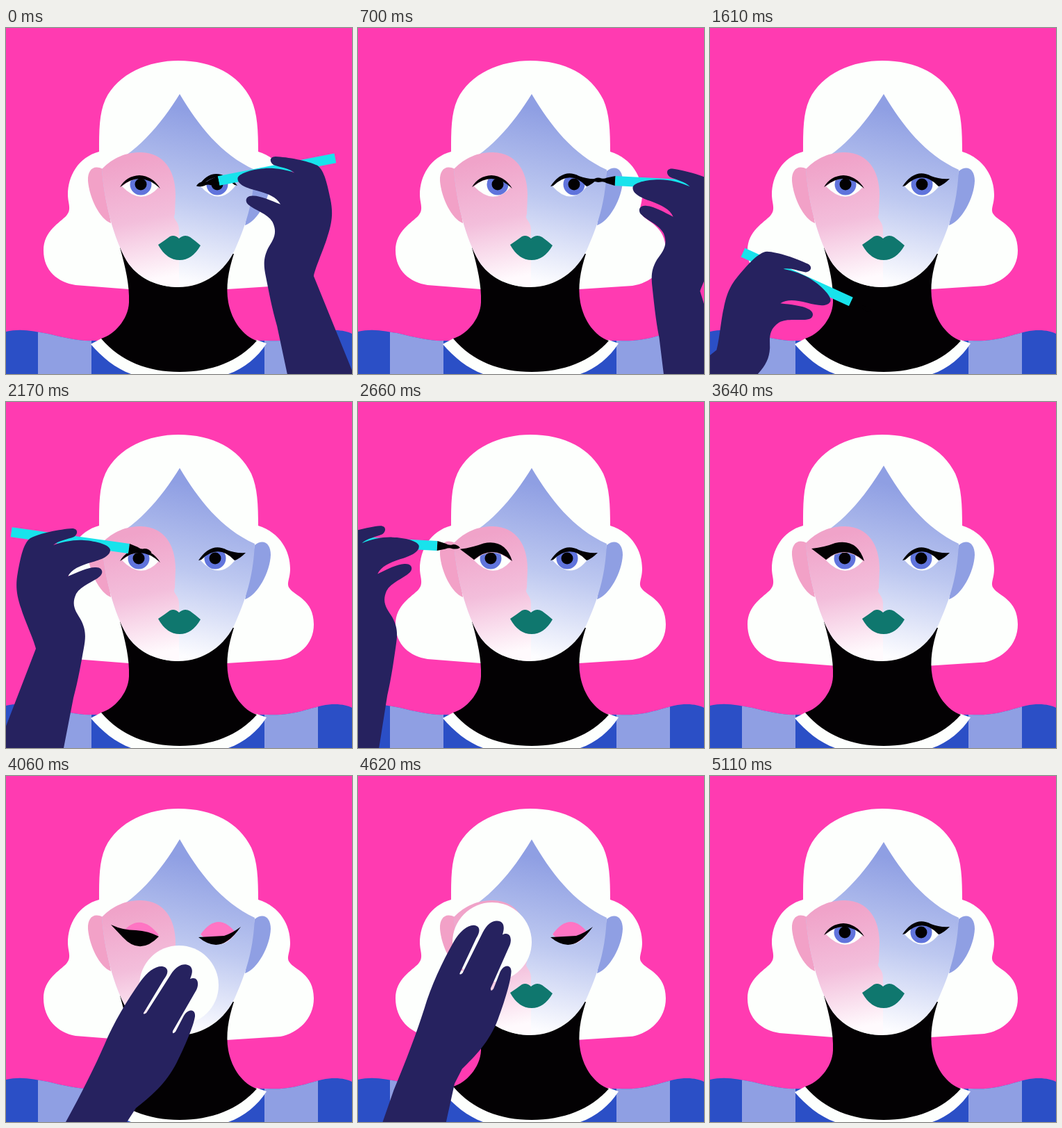
Recreate the animation shown at these times as an HTML page. Size 498 by 498 pixels, loop 5180 ms.

```html
<!DOCTYPE html>
<html lang="en">
<head>
<meta charset="utf-8">
<title>Makeup</title>
<style>
html, body { margin: 0; width: 100%; height: 100%; overflow: hidden; background: #ff3bb1; }
svg { display: block; width: 100vw; height: 100vh; }
.dark { fill: #2b4fc6 }
.light { fill: #8f9fe3 }
.hand { fill: #26225f }
.iris { fill: #6074dc }
.lid { fill: #ff74c3 }
.white { fill: #fdfffd }
</style>
</head>
<body>
<svg viewBox="0 0 498 498">
  <defs>
    <linearGradient id="blue" gradientUnits="userSpaceOnUse" x1="290" y1="125" x2="238" y2="362">
      <stop offset="0" stop-color="#8f9fe3"/><stop offset=".5" stop-color="#bdc8f0"/><stop offset="1" stop-color="#fdfdff"/>
    </linearGradient>
    <linearGradient id="pink" gradientUnits="userSpaceOnUse" x1="180" y1="190" x2="215" y2="362">
      <stop offset="0" stop-color="#f0a3c9"/><stop offset=".5" stop-color="#f3bedb"/><stop offset="1" stop-color="#fffafd"/>
    </linearGradient>
    <clipPath id="shirt"><path d="M0 437C20 432 40 436 60 440C85 446 105 451 125 450L375 450C410 452 430 443 455 437C475 433 490 436 498 440V498H0Z"/></clipPath>
    <clipPath id="openL"><path d="M167 228Q194 205 220 229Q195 257 167 228Z"/></clipPath>
    <clipPath id="openR"><path d="M280 228Q306 202 331 226Q307 258 280 228Z"/></clipPath>
  </defs>
  <rect width="498" height="498" fill="#ff3bb1"/>
  <path id="hair" class="white"/>
  <g clip-path="url(#shirt)">
    <rect class="dark" y="425" width="498" height="75"/>
    <rect class="light" x="46" y="425" width="77" height="75"/>
    <rect class="light" x="372" y="425" width="77" height="75"/>
  </g>
  <path class="white" d="M137 447L122 455C138 474 158 490 180 498H320C343 490 362 474 375 454L361 449Z"/>
  <path fill="#030103" d="M164 316C172 345 178 370 177 395C176 420 155 442 137 447C165 480 205 495 250 495C295 495 335 480 361 450C342 444 325 422 320 395C316 372 320 350 328 325Z"/>
  <path fill="#f2a1c7" d="M139 203C126 196 117 205 118 220C120 245 135 275 151 281Z"/>
  <path class="light" d="M358 206C370 196 381 203 381 220C380 245 362 278 344 284Z"/>
  <path id="face" fill="url(#blue)"/>
  <path fill="url(#pink)" d="M138 203C155 186 172 179 195 179C227 180 244 205 244 240L243 268C239 276 249 277 249 290V373C218 372 193 361 177 340C160 315 142 260 138 203Z"/>
  <g id="eyes"></g>
  <path id="lips" fill="#0f776e"/>
  <ellipse id="mouth" cx="250" cy="315" fill="#030103"/>
  <g id="painter">
    <g id="pen">
      <rect x="-171" y="-7" width="171" height="14" fill="#18e3ec"/>
      <path fill="#030103" d="M0-7L12-4Q17-1 22-3Q28-4 33 1Q28 4 22 3Q17 1 12 4L0 7Z"/>
    </g>
    <path id="grip" class="hand" d="M-90 700L43 355C40 342 26 312 22 298C14 275 14 262 17 245C21 224 25 203 35 196C48 189 78 183 95 182C104 182 104 190 98 194C88 198 76 199 68 206C82 201 98 198 112 199C130 200 150 206 150 213C150 222 137 227 122 231C106 236 95 240 89 251C103 245 118 238 128 238C139 237 141 246 135 251C126 259 108 264 101 276C93 293 101 302 108 314C115 328 115 338 112 354C108 376 104 400 97 426L83 498L43 700Z"/>
  </g>
  <g id="wiper">
    <circle class="white" cx="249" cy="301" r="57"/>
    <path class="hand" d="M10 660L86 498C108 458 128 418 142 386C155 355 174 323 194 295C204 281 216 273 225 274C235 276 234 284 227 293L198 341Q197 344 202 341L237 286C246 272 256 269 264 273C270 277 268 285 265 292C275 288 279 297 274 308L240 367Q239 373 244 368L256 345C263 334 273 336 272 346C270 360 257 390 246 412C230 444 207 462 187 478L174 498L120 660Z"/>
  </g>
</svg>
<script>
const LOOP = 5180, STEP = 70;
const $ = id => document.getElementById(id);
const lerp = (a, b, k) => a + (b - a) * k;

// Blends two path strings that share the same commands.
function mix(from, to, k) {
  const target = to.match(/-?[\d.]+/g);
  let i = 0;
  return from.replace(/-?[\d.]+/g, n => lerp(+n, +target[i++], k).toFixed(2));
}

// Rows are [time, ...values], eased between neighbours.
function track(rows, t) {
  if (t <= rows[0][0]) return rows[0].slice(1);
  for (let i = 1; i < rows.length; i++) {
    const a = rows[i - 1], b = rows[i];
    if (t <= b[0]) {
      const u = (t - a[0]) / (b[0] - a[0]), k = u * u * (3 - 2 * u);
      return a.slice(1).map((v, j) => lerp(v, b[j + 1], k));
    }
  }
  return rows[rows.length - 1].slice(1);
}

const HAIR = [
  'M134 178C134 148 134 123 143 103C161 65 206 47 248 47C298 47 335 67 353 103C362 123 363 148 363 178C395 188 409 215 409 240C409 255 403 261 408 268C415 279 443 284 443 320C443 350 420 367 395 371L318 376H177L100 370C75 366 54 350 54 320C54 292 78 280 87 270C95 261 89 252 89 240C89 213 104 186 134 178Z',
  'M134 178C134 148 134 123 143 103C161 65 206 47 248 47C298 47 335 67 353 103C362 123 363 148 363 178C395 188 409 215 409 240C409 255 403 261 408 268C415 279 443 284 443 320C443 350 420 370 395 375L318 380H177L100 374C75 370 54 350 54 320C54 292 78 280 87 270C95 261 89 252 89 240C89 213 104 186 134 178Z'
];
const FACE = [
  'M250 95C222 140 187 182 138 203C142 260 160 315 177 340C193 361 218 373 248 373C285 373 316 350 330 318C349 275 356 245 358 204C309 182 277 140 250 95Z',
  'M250 91C222 138 187 181 138 203C142 260 160 315 177 340C193 361 218 373 248 373C285 373 316 350 330 318C349 275 356 245 358 204C309 181 277 138 250 91Z'
];
const LIPS = [
  'M219 312Q228 306 236 300Q243 297 249 303Q257 296 265 301Q272 306 280 313Q268 334 250 334Q231 334 219 312Z',
  'M221 314Q229 306 235 298Q243 294 249 301Q257 294 264 299Q270 306 278 314Q271 338 250 338Q228 338 221 314Z'
];
// Each eye: plain open, winged open, plain closed, winged closed lash shapes.
const EYES = [
  { side: 'L', x: 194, pupil: 'M167 228Q194 205 220 229Q195 257 167 228Z',
    lid: ['M165 228Q192 193 220 229Q194 206 165 228Z', 'M165 228Q192 193 220 229Q194 257 165 228Z'],
    lash: [
      'M164 229Q173 213 192 212Q211 213 222 231Q194 205 167 227Z',
      'M146 211Q165 209 180 203Q212 196 222 229Q194 204 167 227Z',
      'M163 228Q174 224 187 223Q205 224 220 231Q194 259 168 232Z',
      'M151 214Q168 222 187 222Q205 223 220 231Q193 259 168 232Z'] },
  { side: 'R', x: 304, pupil: 'M280 228Q306 202 331 226Q307 258 280 228Z',
    lid: ['M280 228Q305 193 331 226Q306 204 280 228Z', 'M280 228Q305 193 331 226Q306 257 280 228Z'],
    lash: [
      'M277 228Q287 211 303 210Q321 210 333 227Q306 203 281 227Z',
      'M277 228Q295 201 318 213Q330 218 345 217Q336 226 329 228Q306 203 281 227Z',
      'M277 232Q293 230 308 230Q322 226 330 225Q304 260 277 232Z',
      'M277 232Q297 231 314 230Q326 226 338 217Q328 231 319 237Q300 251 277 232Z'] }
];
// Keep the same commands for wingless right lashes so they blend.
EYES[1].lash[0] = 'M277 228Q290 206 310 211Q326 216 333 227Q331 226 329 226Q306 203 281 227Z';
EYES[1].lash[2] = 'M277 232Q297 231 314 229Q324 226 330 225Q325 233 319 237Q300 251 277 232Z';

$('eyes').innerHTML = EYES.map(({ side, x, pupil }) => `
  <path class="white" d="${pupil}"/>
  <g clip-path="url(#open${side})"><g id="iris${side}">
    <circle class="iris" cx="${x}" cy="225" r="15.5"/>
    <circle cx="${x}" cy="225" r="8.5" fill="#030103"/>
  </g></g>
  <path id="lid${side}" class="lid"/>
  <path id="lash${side}" fill="#030103"/>`).join('');

// time, fingertip x, y, hand turn, pen end x, y, pen turn
const RIGHT_HAND = [
  [0, 117, 193, 1, 192, 220, 11],
  [140, 113, 193, 1, 188, 218, 10],
  [490, 66, 206, -3, 141, 218, 0],
  [700, 53, 210, -4, 128, 220, -3],
  [1080, -175, 300, 4, -95, 320, 4]
];
const LEFT_HAND = [
  [1330, -30, 500, 44, 20, 550, 34],
  [1610, 143, 350, 30, 203, 394, 24.5],
  [1960, 112, 204, 5, 187, 225, 11],
  [2170, 102, 190, 0, 177, 211, 8],
  [2380, 82, 182, -1, 157, 203, 6],
  [2660, 39, 186, -2, 114, 207, 3],
  [2800, 38, 188, -1, 113, 209, 3],
  [3150, 88, 343, 17, 158, 370, 11],
  [3430, -80, 520, 35, -15, 560, 22]
];
// time, x, y, turn about the pad
const WIPER = [
  [3640, -190, 330, -8],
  [3920, -12, 18, 0],
  [4060, 0, 0, 0],
  [4270, -50, -66, -6],
  [4410, -68, -72, -8],
  [4550, -48, -64, -4],
  [4690, -64, -60, -8],
  [5040, -250, 340, -18]
];
const GAZE = [[0, 0], [490, 6], [700, 7], [1000, 7], [1330, 0], [1610, 1], [2170, -3], [3290, -3], [3640, 0]];
const WING_R = [[70, 0], [630, 1]];
const WING_L = [[2170, 0], [2730, 1], [4340, 1], [4620, 0]];
const SHUT = [[3710, 0], [3920, 1], [4760, 1], [4900, 0]];
const POUT = [[2800, 0], [2940, 1], [3430, 1], [3640, 0]];
const TENSE = [[2800, 0], [3150, .7], [4060, 1], [4550, 1], [5040, 0]];

function draw(t) {
  const [gaze] = track(GAZE, t), [shut] = track(SHUT, t);
  const [pout] = track(POUT, t), [tense] = track(TENSE, t);
  const wings = [track(WING_L, t)[0], track(WING_R, t)[0]];

  $('hair').setAttribute('d', mix(...HAIR, tense));
  $('face').setAttribute('d', mix(...FACE, tense));
  $('lips').setAttribute('d', mix(...LIPS, pout));
  $('mouth').setAttribute('rx', 8 * pout);
  $('mouth').setAttribute('ry', 3.5 * pout);

  EYES.forEach(({ side, lid, lash }, i) => {
    const open = mix(lash[0], lash[1], wings[i]);
    const closed = mix(lash[2], lash[3], wings[i]);
    $('iris' + side).setAttribute('transform', `translate(${gaze})`);
    $('lid' + side).setAttribute('d', mix(...lid, shut));
    $('lid' + side).setAttribute('visibility', shut ? 'visible' : 'hidden');
    $('lash' + side).setAttribute('d', mix(open, closed, shut));
  });

  const mirrored = t < 1200;
  const [x, y, turn, px, py, penTurn] = track(mirrored ? RIGHT_HAND : LEFT_HAND, t);
  const handShown = t < 1080 || (t > 1330 && t < 3430);
  $('painter').setAttribute('visibility', handShown ? 'visible' : 'hidden');
  $('painter').setAttribute('transform', mirrored ? 'translate(498) scale(-1 1)' : '');
  $('grip').setAttribute('transform', `translate(${x} ${y}) rotate(${turn}) translate(-102 -190)`);
  $('pen').setAttribute('transform', `translate(${px} ${py}) rotate(${penTurn})`);

  const [wx, wy, wTurn] = track(WIPER, t);
  $('wiper').setAttribute('visibility', t > 3640 && t < 5040 ? 'visible' : 'hidden');
  $('wiper').setAttribute('transform', `translate(${wx} ${wy}) rotate(${wTurn} 249 301)`);
}

const start = performance.now();
function tick() {
  const t = (performance.now() - start) % LOOP;
  draw(Math.floor(t / STEP) * STEP);
  requestAnimationFrame(tick);
}
tick();
</script>
</body>
</html>
```
